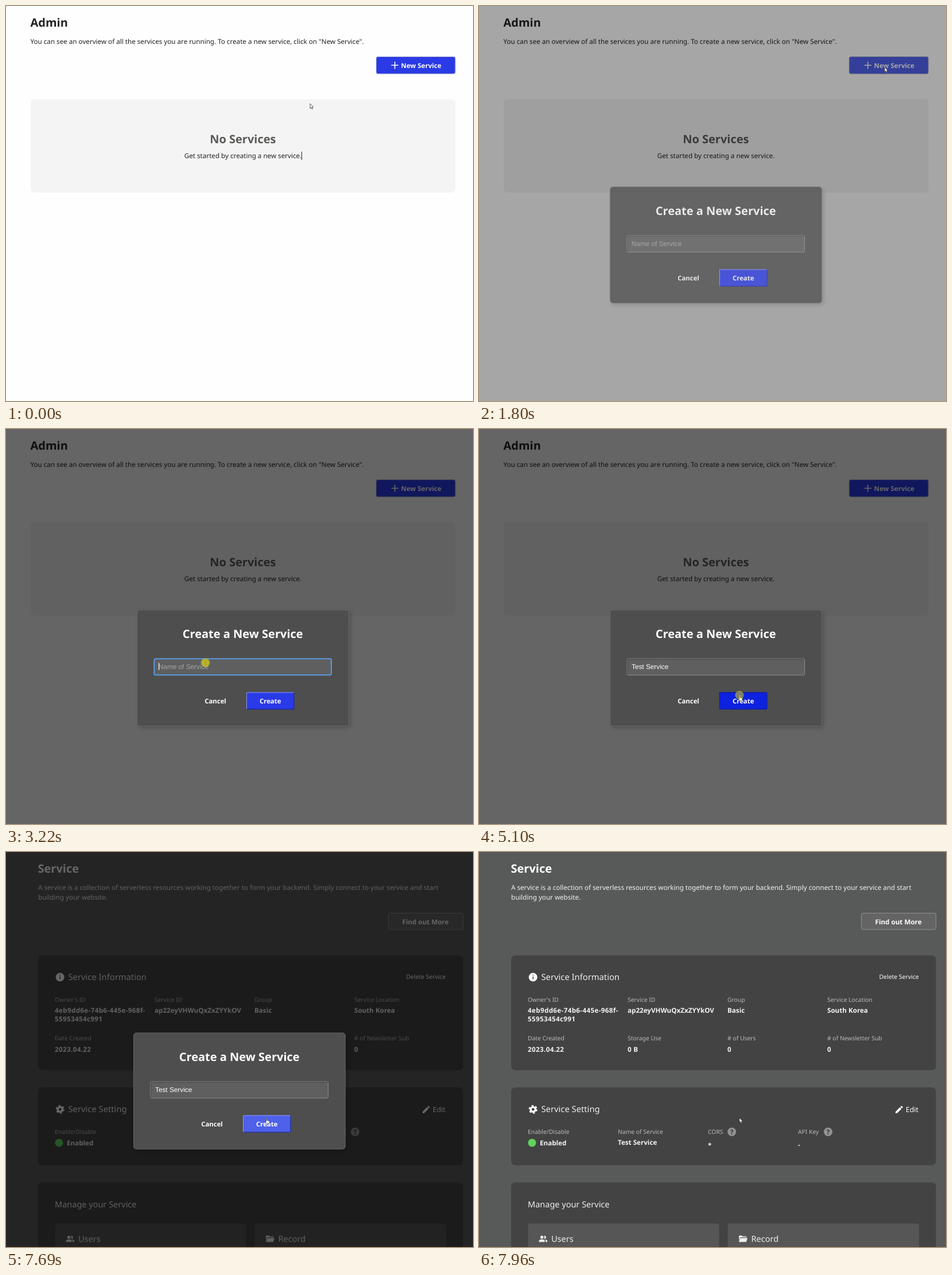
Recreate the animation shown at these times as an HTML page. Size 814 by 688 pixels, loop 8680 ms.

```html
<!DOCTYPE html>
<html lang="en">
<head>
<meta charset="utf-8">
<title>Create a service</title>
<style>
html, body { margin: 0; width: 100%; height: 100%; overflow: hidden; background: #fefefe; }
svg { display: block; width: 814px; height: 688px; }
text { font: 11.65px "Noto Sans", sans-serif; text-rendering: geometricPrecision; white-space: pre; }
.h1 { font-size: 20px; font-weight: 700; }
.h2 { font-size: 14.75px; }
.h3 { font-size: 14.5px; }
.b { font-weight: 700; }
.label { font-size: 10.35px; fill: #b9b9b9; }
.num { letter-spacing: .34px; }
.mid { text-anchor: middle; }
.end { text-anchor: end; }
.field { font: 11.8px "Liberation Sans", Arial, sans-serif; }
.line { fill: none; stroke-width: 1; }

/* One loop is 8680 ms; values hold until the next keyframe. */
.a { animation: 8680ms step-end infinite; }

#admin { animation-name: admin; }
#service { animation-name: service; }
@keyframes admin { 0% { visibility: visible } 88.59%, 100% { visibility: hidden } }
@keyframes service { 0% { visibility: hidden } 88.59%, 100% { visibility: visible } }

#blink { animation-name: blink; }
@keyframes blink { 0% { opacity: 1 } 6.1%, 100% { opacity: 0 } }

#new { animation-name: new; }
@keyframes new {
  0% { fill: #2a3ae6; stroke: #8d93cc }
  12.2% { fill: #5060ea; stroke: #8d93cc }
  17.62% { fill: #0d22e0; stroke: #0a1aa8 }
  19.93% { fill: #5060ea; stroke: #8d93cc }
  26.2%, 100% { fill: #2a3ae6; stroke: #8d93cc }
}

#shade { animation-name: shade; }
@keyframes shade {
  0% { opacity: 0 }
  19.93% { opacity: .15 }
  20.73% { opacity: .35 }
  21.54% { opacity: .5 }
  22.35% { opacity: .58 }
  23.15% { opacity: .6 }
  89.4% { opacity: .46 }
  90.2% { opacity: .26 }
  90.89% { opacity: .09 }
  91.7%, 100% { opacity: 0 }
}

#modal { animation-name: modal; }
@keyframes modal {
  0% { opacity: 0; transform: none }
  19.93% { opacity: .4 }
  20.73% { opacity: .75 }
  21.54% { opacity: .92 }
  22.35% { opacity: .98 }
  23.15% { opacity: 1; transform: none }
  88.59% { opacity: 1; transform: translateX(-6px) }
  89.4% { opacity: .76 }
  90.2% { opacity: .43 }
  90.89% { opacity: .15 }
  91.7%, 100% { opacity: 0; transform: translateX(-6px) }
}

.focus { animation-name: focus; }
@keyframes focus { 0% { opacity: 0 } 37.09% { opacity: 1 } 58.17%, 100% { opacity: 0 } }
#hint { animation-name: hint; }
@keyframes hint { 0% { opacity: 1 } 39.4%, 100% { opacity: 0 } }

@property --x { syntax: "<length>"; inherits: true; initial-value: 0px; }
#typing { animation-name: typing; }
#cut { width: var(--x); }
#caret { transform: translateX(var(--x)); }
@keyframes typing {
  0% { --x: 0px }
  39.4% { --x: 7.2px }
  40.2% { --x: 12.5px }
  40.89% { --x: 18.4px }
  41.7% { --x: 21.6px }
  44.7% { --x: 24.9px }
  45.5% { --x: 32.8px }
  46.19% { --x: 39.4px }
  47% { --x: 43.3px }
  47.81% { --x: 49.2px }
  48.73% { --x: 51.8px }
  49.53% { --x: 57.7px }
  50.34%, 100% { --x: 65px }
}

#create { animation-name: create; }
@keyframes create {
  0% { fill: #2a3ae6 }
  55.87% { fill: #4f60ea }
  58.17% { fill: #0d22e0 }
  59.56%, 100% { fill: #4f60ea }
}
#bevel { animation-name: bevel; }
@keyframes bevel { 0% { stroke: #8f98ee } 58.17% { stroke: #0c1790 } 59.56%, 100% { stroke: #8f98ee } }

#word { animation-name: word; }
#load { animation-name: load; }
@keyframes word { 0% { opacity: 1 } 60.2% { opacity: 0 } 88.59%, 100% { opacity: 1 } }
@keyframes load { 0% { opacity: 0 } 60.2% { opacity: 1 } 88.59%, 100% { opacity: 0 } }
#spin { transform-origin: 460.5px 473px; animation: spin 868ms linear infinite; }
@keyframes spin { to { transform: rotate(360deg) } }

#mouse { animation-name: mouse; }
@keyframes mouse {
  0% { transform: translate(530px, 170px) }
  3.8% { transform: translate(530px, 170px); animation-timing-function: steps(13, start) }
  13.79% { transform: translate(707px, 106.5px) }
  25.46% { transform: translate(707px, 106.5px); animation-timing-function: steps(9, start) }
  32.59% { transform: translate(347.5px, 406.5px) }
  51.15% { transform: translate(347.5px, 406.5px); animation-timing-function: steps(5, start) }
  55.18% { transform: translate(449px, 453px) }
  55.87%, 100% { transform: translate(454px, 463px) }
}
#arrow { animation-name: arrow; }
#beam { animation-name: beam; }
#hand { animation-name: hand; }
#press { animation-name: press; }
@keyframes arrow {
  0% { opacity: 1 } 31.1% { opacity: 0 } 51.15% { opacity: 1 }
  55.87% { opacity: 0 } 89.4%, 100% { opacity: 1 }
}
@keyframes beam { 0% { opacity: 0 } 31.1% { opacity: 1 } 37.67%, 100% { opacity: 0 } }
@keyframes hand { 0% { opacity: 0 } 55.87% { opacity: 1 } 89.4%, 100% { opacity: 0 } }
@keyframes press {
  0% { opacity: 0 } 17.62% { opacity: .6 } 19.93% { opacity: 0 }
  37.09% { opacity: .75 } 37.67% { opacity: 0 }
  58.17% { opacity: .55 } 59.56%, 100% { opacity: 0 }
}
</style>
</head>
<body>
<svg viewBox="0 0 814 688">
  <g id="admin" class="a" fill="#222">
    <rect width="814" height="688" fill="#fefefe"/>
    <text class="h1" x="42.5" y="35.5">Admin</text>
    <text x="42.5" y="65.7">You can see an overview of all the services you are running. To create a new service, click on "New Service".</text>
    <rect id="new" class="a" x="645.5" y="88.5" width="137.5" height="29.5" rx="3" stroke-width="1.2"/>
    <path class="line" d="M671.5 103.2h12.5M677.7 97v12.4" stroke="#fff" style="stroke-width:1.6"/>
    <text class="b" x="688.6" y="107.8" fill="#fff" style="font-size:11.55px">New Service</text>
    <rect x="43" y="162.5" width="740.5" height="162.5" rx="7" fill="#f4f4f4"/>
    <text class="h1 mid" x="412.8" y="239" fill="#5a5a58">No Services</text>
    <text class="mid" x="413" y="265">Get started by creating a new service.</text>
    <rect id="blink" class="a" x="515" y="253.5" width="1" height="14.5"/>
  </g>

  <g id="service" class="a" fill="#fff">
    <rect width="814" height="688" fill="#585a59"/>
    <text class="h1" x="55.5" y="35.5">Service</text>
    <g fill="#f2f2f2">
      <text x="56" y="65.7">A service is a collection of serverless resources working together to form your backend. Simply connect to your service and start</text>
      <text x="56" y="83.2">building your website.</text>
    </g>
    <rect x="666.5" y="106.5" width="130" height="28.5" rx="2.5" fill="#636463" stroke="#8e8f8e"/>
    <text class="b mid" x="731" y="125.6">Find out More</text>

    <g fill="#434343">
      <rect x="56" y="180" width="740.5" height="200" rx="7"/>
      <rect x="56" y="410" width="740.5" height="135.5" rx="7"/>
      <rect x="56" y="575.5" width="740.5" height="130" rx="7"/>
    </g>

    <circle cx="94.2" cy="218" r="7.5"/>
    <path d="M93.5 213.7h1.5v1.6h-1.5zM93.5 216.8h1.5v5h-1.5z" fill="#434343"/>
    <g fill="#eee">
      <text class="h2" x="108.5" y="223">Service Information</text>
      <text class="h2" x="108.5" y="453.3">Service Setting</text>
      <text class="h3" x="85" y="619">Manage your Service</text>
    </g>
    <text class="end" x="766.5" y="221" style="font-size:10.4px;font-weight:500">Delete Service</text>

    <g class="label">
      <text class="label" x="85" y="260.7">Owner's ID</text>
      <text class="label" x="259" y="260.7">Service ID</text>
      <text class="label" x="433" y="260.7">Group</text>
      <text class="label" x="607" y="260.7">Service Location</text>
      <text class="label" x="85" y="328.2">Date Created</text>
      <text class="label" x="259" y="328.2">Storage Use</text>
      <text class="label" x="433" y="328.2"># of Users</text>
      <text class="label" x="607" y="328.2"># of Newsletter Sub</text>
      <text class="label" x="85" y="491">Enable/Disable</text>
      <text class="label" x="242" y="491">Name of Service</text>
      <text class="label" x="399" y="491">CORS</text>
      <text class="label" x="556" y="491">API Key</text>
    </g>
    <g fill="#f4f4f4">
      <text class="b num" x="85" y="280">4eb9dd6e-74b6-445e-968f-</text>
      <text class="b num" x="85" y="294.7">55953454c991</text>
      <text class="b" x="259" y="280">ap22eyVHWuQxZxZYYkOV</text>
      <text class="b" x="433" y="280">Basic</text>
      <text class="b" x="607" y="280">South Korea</text>
      <text class="b num" x="85" y="347.7">2023.04.22</text>
      <text class="b num" x="259" y="347.7">0 B</text>
      <text class="b num" x="433" y="347.7">0</text>
      <text class="b num" x="607" y="347.7">0</text>
      <text class="b" x="106" y="510.7">Enabled</text>
      <text class="b" x="242" y="509.7">Test Service</text>
      <text class="b" x="399" y="514.5">*</text>
      <text class="b" x="556" y="513.7">-</text>
    </g>
    <circle cx="92.5" cy="506.5" r="7" fill="#5fd35c"/>

    <g transform="translate(94.2 448.3)">
      <circle r="4.1" class="line" stroke="#fff" style="stroke-width:3.4"/>
      <circle r="6.4" class="line" stroke="#fff" stroke-dasharray="3.35" style="stroke-width:2.4"/>
    </g>
    <path d="M726 455v-2.8l7.6-7.6 2.8 2.8-7.6 7.6zM734.4 443.8l1.4-1.4q.6-.5 1.2 0l1.6 1.6q.5.6 0 1.2l-1.4 1.4z"/>
    <text x="743.8" y="453" style="font-size:12.4px">Edit</text>
    <g fill="#929292">
      <circle cx="440.7" cy="487.5" r="7.5"/>
      <circle cx="608.5" cy="487.5" r="7.5"/>
    </g>
    <g fill="#333">
      <text class="b mid" x="440.7" y="491.6">?</text>
      <text class="b mid" x="608.5" y="491.6">?</text>
    </g>

    <g fill="#565656">
      <rect x="85.5" y="647" width="333" height="60" rx="4"/>
      <rect x="433.5" y="647" width="333.5" height="60" rx="4"/>
    </g>
    <g fill="#eee">
      <circle cx="109.6" cy="671" r="2.7"/>
      <path d="M104.5 679.3v-1.6q0-2.9 5.1-2.9t5.1 2.9v1.6zM113.4 668.4a2.7 2.7 0 1 1 0 5.2q1.4-2.6 0-5.2zM115 675q4.2.4 4.2 2.8v1.5h-3v-1.6q0-1.600-1.200-2.700z"/>
      <text class="h3" x="126" y="679">Users</text>
      <path d="M453 669.500q0-1.500 1.500-1.500h3.600l1.500 1.500h5.600q1.400 0 1.400 1.500h-11l-2 6zM456 672.200h12l-2.200 7h-12.300q-.8 0-.3-1.200z"/>
      <text class="h3" x="474.500" y="679">Record</text>
    </g>
  </g>

  <rect id="shade" class="a" width="814" height="688"/>

  <g id="modal" class="a" fill="#fff">
    <rect x="228.500" y="315" width="369" height="202.500" rx="5" fill="#4e4e4e" stroke="#707070" stroke-width=".8" style="filter:drop-shadow(3px 3px 3px #0003)"/>
    <text class="h1 mid" x="412.700" y="364">Create a New Service</text>
    <rect x="258" y="400" width="309.500" height="28.700" rx="2" fill="#5f5f5f" stroke="#8e8e8e"/>
    <path class="line" d="M259 428v-27h308" stroke="#454545"/>
    <rect class="a focus line" x="258.500" y="400.300" width="308.500" height="28" rx="2" stroke="#5a9cf0" style="stroke-width:1.8"/>
    <text id="hint" class="a field" x="265.800" y="417.800" fill="#a6a6a6">Name of Service</text>
    <g id="typing" class="a">
      <clipPath id="clip"><rect id="cut" x="266" y="400" height="28"/></clipPath>
      <text class="field" x="266" y="417.800" clip-path="url(#clip)">Test Service</text>
      <g class="a focus"><rect id="caret" x="266" y="407" width="1" height="13"/></g>
    </g>
    <text class="b mid" x="365" y="478" style="font-size:11.400px">Cancel</text>
    <rect id="create" class="a" x="419" y="458.500" width="83.500" height="30" rx="2"/>
    <path class="line" d="M420 488h81.500l.500-.500v-28.500" stroke="#1a237c"/>
    <path id="bevel" class="a line" d="M419.500 487.500v-28.500h82"/>
    <text id="word" class="a b mid" x="460.700" y="478" style="font-size:11.400px">Create</text>
    <g id="load" class="a">
      <circle id="spin" class="line" cx="460.500" cy="473" r="7" stroke="#fff" stroke-dasharray="33 11" style="stroke-width:2"/>
    </g>
  </g>

  <g id="mouse" class="a" fill="#fff" stroke="#333" stroke-width=".8" stroke-linejoin="round">
    <path id="arrow" class="a" d="M0 0v8.300l1.900-1.700 1.300 3 1.400-.600-1.300-2.900h2.500z"/>
    <path id="beam" class="a line" d="M-1.500-5.500h4M.500-5.500v11M-1.500 5.500h4" stroke="#222"/>
    <path id="hand" class="a" d="M-.500 1q.800-1.400 1.600 0v3.500l3.400.700q1 .300.900 1.400l-.700 4h-4.200l-2.600-3.700q.300-1.200 1.600 0z"/>
    <circle id="press" class="a" cy=".500" r="7.600" fill="#d6cd22" stroke="none"/>
  </g>
</svg>
</body>
</html>
```
